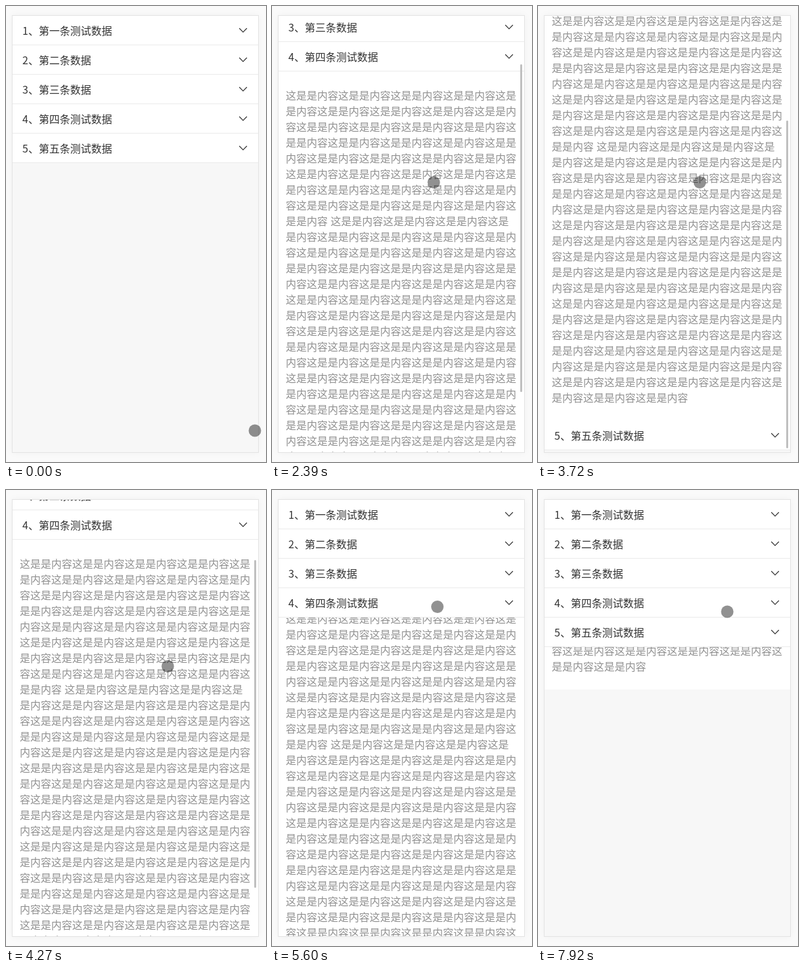
Write an HTML page that moves like this. It is 397 px wide and 697 px high and loops after 8000 ms.

```html
<!DOCTYPE html>
<html lang="zh-CN">
<head>
<meta charset="utf-8">
<style>
html, body { margin: 0; width: 100%; height: 100%; overflow: hidden; background: #fafafa; }
body { position: relative; font: 16px/24px "Noto Sans CJK SC", "Noto Sans CJK", sans-serif; }
#phone {
  position: absolute; left: 9px; top: 14px; width: 375px; height: 667px; overflow: hidden;
  border: 1px solid #e3e3e3; background: #f7f7f7; box-shadow: 0 0 12px rgba(0, 0, 0, .04);
}
.head {
  position: relative; box-sizing: border-box; height: 45px; padding-left: 15px;
  line-height: 44px; color: #333; background: #fff; border-bottom: 1px solid #ebebeb; white-space: nowrap;
}
.head svg { position: absolute; left: 345px; top: 17px; fill: none; stroke: #333; stroke-width: 1.2; }
.panel { height: 0; overflow: hidden; background: #fff; }
.text { padding: 24px 11px; color: #909090; word-break: break-all; word-spacing: 1px; }
#bar { position: absolute; left: 369px; top: 0; width: 3px; border-radius: 2px; background: #bfbfbf; }
#cursor {
  position: absolute; left: -9.5px; top: -9.5px; width: 19px; height: 19px;
  border-radius: 50%; background: rgba(0, 0, 0, .43);
}
</style>
</head>
<body>
<div id="phone"><div id="list"></div><div id="bar"></div></div>
<div id="cursor"></div>
<script>
const LOOP = 8000, VIEW = 667, MARGIN = 3, EXTRA = 7;
const TOGGLE = 300, WHEEL = 220;
const $ = id => document.getElementById(id);
const clamp = (v, lo, hi) => Math.min(hi, Math.max(lo, v));
const mix = (a, b, k) => a + (b - a) * k;
const smooth = k => (k = clamp(k, 0, 1), k * k * (3 - 2 * k));

const words = n => '这是是内容'.repeat(n);
const items = [
  { title: '第一条测试数据' },
  { title: '第二条数据' },
  { title: '第三条数据' },
  { title: '第四条测试数据', text: words(36) + ' ' + words(72), open: 1640, close: 5580 },
  { title: '第五条测试数据', text: words(36) + ' ' + words(36), open: 6444, close: 7752 }
];

// Three wheel notches down, three up, and later a slight nudge
const wheel = [
  ...[2200, 3035, 3580].map(at => ({ at, by: 100 })),
  ...[4085, 4290, 4560].map(at => ({ at, by: -100 })),
  { at: 6830, by: 5 }
];

// Pointer glides: start, end, and where it comes to rest
const glides = [
  { from: 60, to: 910, x: 258, y: 187 },
  { from: 910, to: 1080, x: 269.5, y: 174.5 },
  { from: 1790, to: 2390, x: 246.5, y: 269 },
  { from: 4890, to: 5500, x: 252, y: 178 },
  { from: 5700, to: 6430, x: 243, y: 220 },
  { from: 6430, to: 6600, x: 243.5, y: 261.5 },
  { from: 6700, to: 7150, x: 287.5, y: 203.5 },
  { from: 7640, to: 7920, x: 288.5, y: 185.5 }
];

$('list').innerHTML = items.map(({ title, text = '' }, i) =>
  `<div class="head">${i + 1}、${title}<svg width="14" height="10"><path d="M1.2 2l5.8 5.8L12.8 2"/></svg></div>` +
  `<div class="panel"><div class="text">${text}</div></div>`
).join('');
document.querySelectorAll('.panel').forEach((panel, i) => items[i].panel = panel);
const foldable = items.filter(item => item.text);

// CSS "ease", solved by bisection
function ease(x) {
  const curve = (a, b, u) => 3 * a * u * (1 - u) ** 2 + 3 * b * u * u * (1 - u) + u ** 3;
  let lo = 0, hi = 1;
  for (let i = 0; i < 20; i++) {
    const mid = (lo + hi) / 2;
    if (curve(.25, .25, mid) < clamp(x, 0, 1)) lo = mid; else hi = mid;
  }
  return curve(.1, 1, lo);
}

// Opens downwards; when closing, the text leaves with the rising edge.
function fold({ panel, open, close }, t) {
  const text = panel.firstChild, full = text.offsetHeight;
  const closing = t >= close;
  const shown = closing ? 1 - ease((t - close) / TOGGLE) : ease((t - open) / TOGGLE);
  panel.style.height = full * shown + 'px';
  text.style.transform = `translateY(${closing ? full * (shown - 1) : 0}px)`;
}

function scrollAt(t, limit) {
  let goal = 0, pos = 0;
  for (const { at, by } of wheel) {
    const next = clamp(goal + by, 0, limit);
    pos += (next - goal) * smooth((t - at) / WHEEL);
    goal = next;
  }
  return Math.round(clamp(pos, 0, limit));
}

// The bar wakes on a scroll or an overflowing panel, then fades out.
function barAlpha(t) {
  const wakes = [...wheel.map(w => w.at), ...foldable.map(f => f.open + 200)];
  return Math.max(...wakes.map(at => t < at ? 0 : clamp(1 - (t - at - WHEEL - 300) / 200, 0, 1)));
}

function draw(t) {
  foldable.forEach(item => fold(item, t));
  const total = $('list').offsetHeight + EXTRA;
  const limit = Math.max(0, total - VIEW);
  const scroll = scrollAt(t, limit);
  $('list').style.transform = `translateY(${-scroll}px)`;

  const ratio = (VIEW - 2 * MARGIN) / total;
  const bar = $('bar').style;
  bar.opacity = limit ? barAlpha(t) : 0;
  bar.height = Math.round(VIEW * ratio) + 'px';
  bar.transform = `translateY(${Math.round(MARGIN + scroll * ratio)}px)`;

  let x = 379.5, y = 648.5;
  for (const g of glides) {
    const k = smooth((t - g.from) / (g.to - g.from));
    x = mix(x, g.x, k);
    y = mix(y, g.y, k);
  }
  $('cursor').style.transform = `translate(${x}px, ${y}px)`;
}

// Panels without text stay collapsed at height 0.
const begin = performance.now();
function tick() {
  draw((performance.now() - begin) % LOOP);
  requestAnimationFrame(tick);
}
tick();
</script>
</body>
</html>
```
